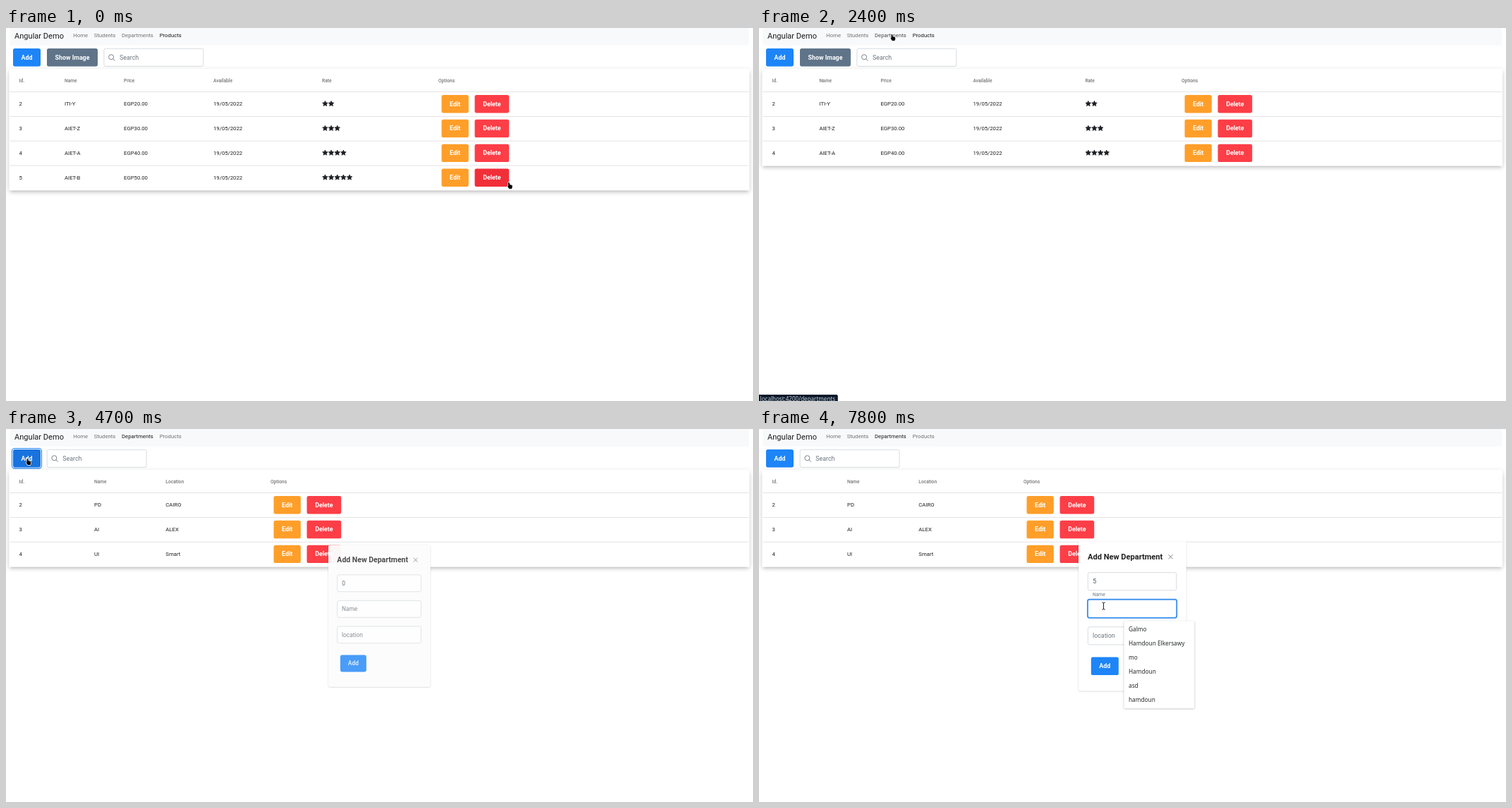
Write an HTML page with a canvas that moves like this. It is 1059 by 529 pixels and loops after 8000 ms.

```html
<!DOCTYPE html>
<html lang="en">
<head>
<meta charset="utf-8">
<title>Angular Demo</title>
<style>
  html, body { margin: 0; width: 100%; height: 100%; overflow: hidden; background: #fff; }
  canvas { display: block; }
</style>
</head>
<body>
<canvas id="stage" width="1059" height="529"></canvas>
<script>
const ctx = document.getElementById('stage').getContext('2d');
const LOOP = 8000, STEP = 100;
const ROW = 34.85, LEFT = 5.5, WIDTH = 1047.5, TOP = 59;
const BLUE = '#1d85f8', ORANGE = '#ff9e29', RED = '#fd3e47', SLATE = '#5f7489';
const GREY = '#6c757d', INK = '#212121';
const SMALL = 6.64, CELL = 7.74, BODY = 8.85, TITLE = 11.07;
const ROBOTO = 'Roboto, sans-serif', NOTO = '"Noto Sans", sans-serif';

const PRODUCTS = [
  ['2', 'ITI-Y', 'EGP20.00', '19/05/2022', 2],
  ['3', 'AIET-Z', 'EGP30.00', '19/05/2022', 3],
  ['4', 'AIET-A', 'EGP40.00', '19/05/2022', 4],
  ['5', 'AIET-B', 'EGP50.00', '19/05/2022', 5]
];
const DEPARTMENTS = [['2', 'PD', 'CAIRO'], ['3', 'AI', 'ALEX'], ['4', 'UI', 'Smart']];
const SUGGESTIONS = ['Galmo', 'Hamdoun Elkersawy', 'mo', 'Hamdoun', 'asd', 'hamdoun'];

// Pointer path: time, x, y, shape
const PATH = [
  [0, 712.5, 219, 'hand'], [100, 712.5, 219, 'hand'], [500, 707, 216, 'hand'],
  [700, 707, 216, 'hand'], [800, 704, 214, 'arrow'], [900, 697, 212.5, 'arrow'],
  [1200, 682, 184, 'hand'], [1600, 675, 173, 'hand'], [1700, 419.5, 142.5, 'arrow'],
  [1900, 270, 50, 'arrow'], [2000, 215, 25, 'arrow'], [2100, 195, 13, 'hand'],
  [2300, 188, 9, 'hand'], [2900, 188, 9, 'hand'], [3000, 190, 13, 'hand'],
  [3100, 205, 22, 'arrow'], [3200, 205, 22, 'arrow'], [3400, 330, 95, 'arrow'],
  [3600, 382, 121, 'arrow'], [3700, 382, 121, 'arrow'], [3800, 382, 117, 'hand'],
  [3900, 364.5, 113, 'arrow'], [4000, 364.5, 113, 'arrow'], [4200, 75, 48, 'arrow'],
  [4300, 30, 42, 'hand'], [4800, 30, 42, 'hand'], [4900, 70, 58, 'arrow'],
  [5000, 299, 148, 'arrow'], [5100, 299, 148, 'arrow'], [5200, 470, 232, 'arrow'],
  [5300, 510, 246, 'beam'], [5400, 510, 246, 'beam'], [5500, 515.5, 217, 'beam'],
  [6600, 515.5, 217, 'beam'], [7000, 488.5, 251, 'beam'], [LOOP, 488.5, 251, 'beam']
];
const SHAPES = {
  arrow: new Path2D('M0 0V9L2 7.2 3.5 10.4 5 9.7 3.6 6.7 6.4 6.4Z'),
  hand: new Path2D('M-.4 0 1 0 1.6 3 5 4 5.3 6.6 4.4 9 .8 9-1.6 5.8-.5 4.8Z'),
  beam: new Path2D('M-2.2-5Q0-5 0-4 0-5 2.2-5M0-4V4M-2.2 5Q0 5 0 4 0 5 2.2 5')
};

const clamp = v => Math.max(0, Math.min(1, v));
const mix = (a, b, k) => a + (b - a) * k;

function text(str, x, middle, size, color = INK, weight = 400, family = ROBOTO, align = 'left') {
  ctx.font = `${weight} ${size}px ${family}`;
  ctx.textAlign = align;
  ctx.fillStyle = color;
  ctx.fillText(str, x, middle + size * 0.355);
}

function box(x, y, w, h, r, fill, stroke, line = 0.8) {
  ctx.beginPath();
  ctx.roundRect(x, y, w, h, r);
  if (fill) { ctx.fillStyle = fill; ctx.fill(); }
  if (stroke) { ctx.strokeStyle = stroke; ctx.lineWidth = line; ctx.stroke(); }
}

function shadowBox(x, y, w, h, r, shadows) {
  for (const [dy, blur, spread, alpha] of shadows) {
    ctx.save();
    ctx.shadowColor = `rgba(0,0,0,${alpha})`;
    ctx.shadowOffsetY = dy;
    ctx.shadowBlur = blur;
    box(x - spread, y - spread, w + 2 * spread, h + 2 * spread, r, '#fff');
    ctx.restore();
  }
  box(x, y, w, h, r, '#fff');
}

function line(color, width, ...points) {
  ctx.beginPath();
  points.forEach(([x, y]) => ctx.lineTo(x, y));
  ctx.strokeStyle = color;
  ctx.lineWidth = width;
  ctx.stroke();
}

function button(label, x, y, w, color) {
  box(x, y, w, 25.4, 2.6, color);
  text(label, x + w / 2, y + 12.5, BODY, '#fff', 700, ROBOTO, 'center');
}

function input(y, { hover = false, focus = 0 }) {
  box(466.3, y, 125.5, 25.2, 2.4, '#fff', hover ? '#8fb9e6' : '#ced4da');
  if (!focus) return;
  ctx.save();
  ctx.globalAlpha *= focus;
  box(465.8, y - 0.5, 126.5, 26.2, 2.8, null, '#3a90ee', 1.7);
  ctx.restore();
}

function caret(x, middle) {
  ctx.fillStyle = '#495057';
  ctx.fillRect(x, middle - 5.2, 0.7, 10.4);
}

function search(x) {
  box(x + 0.3, 29.3, 140.9, 25.1, 2.4, '#fff', '#ced4da');
  ctx.beginPath();
  ctx.arc(x + 10.5, 41.2, 3.5, 0, 7);
  ctx.strokeStyle = GREY;
  ctx.lineWidth = 0.9;
  ctx.stroke();
  line(GREY, 0.9, [x + 13, 43.7], [x + 15.8, 46.6]);
  text('Search', x + 22.4, 41.8, BODY, GREY);
}

function star(cx, cy) {
  ctx.beginPath();
  for (let i = 0; i < 10; i++) {
    const r = i % 2 ? 1.9 : 4, a = i * Math.PI / 5 - Math.PI / 2;
    ctx.lineTo(cx + r * Math.cos(a), cy + r * Math.sin(a));
  }
  ctx.closePath();
  ctx.fillStyle = ctx.strokeStyle = '#1b1e21';
  ctx.lineWidth = 0.7;
  ctx.lineJoin = 'round';
  ctx.fill();
  ctx.stroke();
}

function navbar(active, hovered) {
  ctx.fillStyle = '#f8f9fa';
  ctx.fillRect(LEFT, 0, WIDTH, 24.6);
  text('Angular Demo', 12, 10.6, TITLE, '#191a1a');
  const links = { Home: 95.2, Students: 124.7, Departments: 164, Products: 217.7 };
  for (const name in links) {
    const alpha = name === active ? 0.9 : name === hovered ? 0.7 : 0.55;
    text(name, links[name], 10.6, CELL, `rgba(0,0,0,${alpha})`);
  }
}

function table(heads, columns, rows, colorOf) {
  shadowBox(LEFT, TOP, WIDTH, 31 + ROW * rows.length, 0,
    [[2.8, 2.8, -1.7, 0.2], [4.4, 5.5, 0.55, 0.14], [1.7, 7.7, 1.1, 0.12]]);
  heads.forEach((h, i) => text(h, columns[i], 74.6, SMALL, 'rgba(0,0,0,.54)', 500));
  const options = columns[columns.length - 1];
  rows.forEach((row, r) => {
    const y = 107.4 + ROW * r;
    ctx.fillStyle = 'rgba(0,0,0,.14)';
    ctx.fillRect(LEFT, 90.1 + ROW * r, WIDTH, 0.8);
    row.forEach((cell, i) => {
      if (typeof cell === 'string') return text(cell, columns[i], y, CELL);
      for (let s = 0; s < cell; s++) star(columns[i] + 4.4 + 8.65 * s, y);
    });
    button('Edit', options + 4.5, y - 12.4, 38.3, colorOf('edit', r) || ORANGE);
    button('Delete', options + 51.5, y - 12.4, 48.7, colorOf('delete', r) || RED);
  });
}

function productsPage(t) {
  const full = t < 800;
  navbar('Products', t >= 2100 && 'Departments');
  button('Add', 10, 29, 39, BLUE);
  button('Show Image', 58, 29, 72, SLATE);
  search(138.6);
  table(['Id.', 'Name', 'Price', 'Available', 'Rate', 'Options'],
    full ? [18.6, 83, 167, 294, 448, 613] : [18.6, 85.4, 172.4, 303.5, 462.4, 599],
    full ? PRODUCTS : PRODUCTS.slice(0, 3),
    (kind, r) => {
      if (kind !== 'delete') return;
      if (full && r === 3) return t < 200 ? '#f12f39' : '#ea2430';
      if (r === 2 && t >= 1200 && t < 1800) return '#ea2430';
    });
}

function departmentsPage(t) {
  navbar('Departments');
  const ring = t < 4500 ? 0 : t < 5600 ? 1 : t < 5800 ? 0.5 : 0;
  if (ring) {
    ctx.globalAlpha = ring;
    box(8.5, 27.5, 42, 28.4, 3.6, null, BLUE, 1.1);
    ctx.globalAlpha = 1;
  }
  button('Add', 10, 29, 39, t >= 4300 && t < 4900 ? '#1873de' : BLUE);
  search(57.9);
  table(['Id.', 'Name', 'Location', 'Options'], [18.6, 125, 226.3, 375], DEPARTMENTS,
    (kind, r) => kind === 'edit' && r === 0 && t >= 3800 && t < 4200 && '#e47b1e');
  if (t >= 4500) dialog(t);
}

function dialog(t) {
  const k = clamp((t - 4500) / 400), cx = 529.4, cy = 265.5;
  const scale = mix(0.7, 1, 1 - (1 - k) ** 2.5);
  ctx.save();
  ctx.globalAlpha = clamp(k * 1.6);
  ctx.translate(cx, cy);
  ctx.scale(scale, scale);
  ctx.translate(-cx, -cy);
  shadowBox(453, 159.4, 152.6, 212, 2.2, [[0.55, 1.7, 0, 0.3]]);
  text('Add New Department', 466, 181.2, TITLE, INK, 700);
  line(GREY, 0.9, [580.4, 178.1], [586.6, 184.3]);
  line(GREY, 0.9, [586.6, 178.1], [580.4, 184.3]);

  const value = t < 6000 ? '0' : t < 6600 ? '' : '5';
  const idFocus = t < 5600 || t >= 7300 ? 0 : t < 5800 || t >= 7200 ? 0.55 : 1;
  input(203.6, { hover: t >= 5500 && t < 5600, focus: idFocus });
  text(value, 473.2, 215.9, BODY, '#495057');
  if (t >= 5600 && t < 7200) caret(473.2 + (value ? 5 : 0), 216.1);

  const nameHover = t >= 5300 && t < 5500 || t >= 6900;
  const float = clamp((t - 7100) / 300);
  input(242.2, { hover: nameHover, focus: clamp((t - 7100) / 200) });
  text('Name', 473, mix(254.5, 234.2, float), mix(BODY, SMALL, float), GREY);
  if (t >= 7200 && t < 7800) caret(473.2, 254.6);

  input(280.7, {});
  text('location', 473, 293.1, BODY, GREY);
  button('Add', 470.8, 323.6, 39, BLUE);
  ctx.restore();
  if (t >= 7300) suggestions();
}

function suggestions() {
  shadowBox(517.6, 272.6, 99.6, 123.6, 1.5, [[0.6, 2.6, 0, 0.35]]);
  ctx.fillStyle = '#f1f1f1';
  ctx.fill(new Path2D('M525.5 272.6 529.5 269.4 533.5 272.6Z'));
  SUGGESTIONS.forEach((s, i) => text(s, 524, 284.2 + 19.9 * i, 8.28, '#26282a', 400, NOTO));
}

function statusBar() {
  box(-3, 520, 114.8, 12, 2, '#0b1a2c');
  text('localhost:4200/departments', 1.6, 526.4, 8.05, '#c9ced4', 400, NOTO);
}

function pointer(t) {
  let i = PATH.length - 2;
  while (PATH[i][0] > t) i--;
  const [t0, x0, y0, shape] = PATH[i], [t1, x1, y1] = PATH[i + 1];
  const k = (t - t0) / (t1 - t0);
  ctx.save();
  ctx.translate(mix(x0, x1, k), mix(y0, y1, k));
  ctx.lineJoin = 'round';
  ctx.strokeStyle = '#fff';
  ctx.lineWidth = shape === 'beam' ? 2.2 : 1.3;
  ctx.stroke(SHAPES[shape]);
  if (shape === 'beam') {
    ctx.strokeStyle = '#222';
    ctx.lineWidth = 1;
    ctx.stroke(SHAPES.beam);
  } else {
    ctx.fillStyle = '#050505';
    ctx.fill(SHAPES[shape]);
  }
  ctx.restore();
}

function draw() {
  const t = Math.floor(performance.now() % LOOP / STEP) * STEP;
  ctx.fillStyle = '#fff';
  ctx.fillRect(0, 0, 1059, 529);
  (t < 2900 ? productsPage : departmentsPage)(t);
  if (t >= 2300 && t < 3400) statusBar();
  pointer(t);
  requestAnimationFrame(draw);
}
draw();
</script>
</body>
</html>
```
